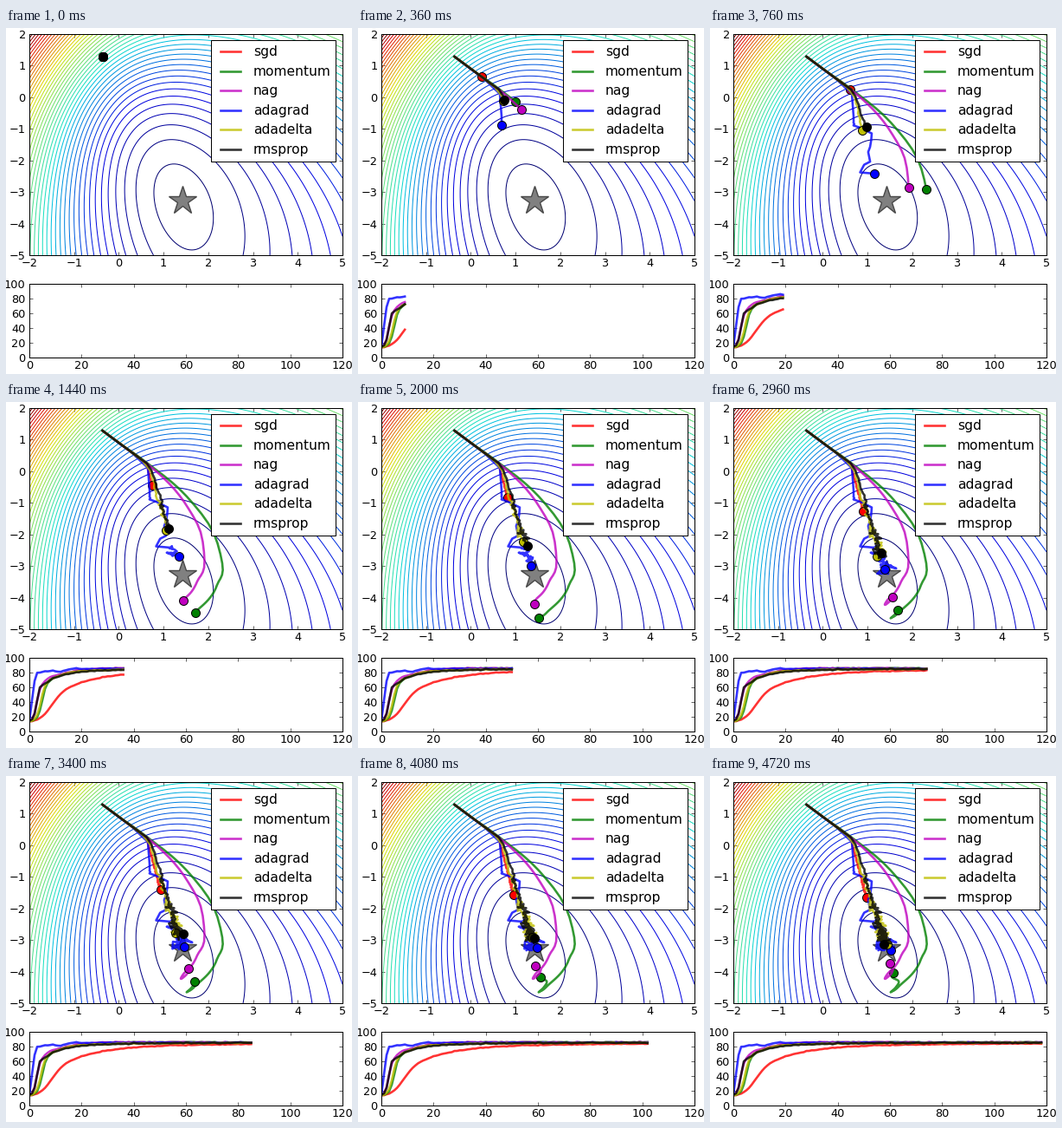
Write a matplotlib script that moves like this. It is 400 px wide and 399 px high and loops after 4.76 s.

```python
import numpy as np
import matplotlib.pyplot as plt
from matplotlib.animation import FuncAnimation
from matplotlib.patches import Rectangle

W, H, DPI = 400, 399, 64
PT = 72 / DPI                      # points per pixel
FRAMES, INTERVAL = 119, 40
HELD = (29, 58, 116)               # frames that repeat the one before
STEPS = np.arange(FRAMES)
NOISE = 0.23                       # spread of the two moons
START = (0, 111.5, 33)
STAR = (204.3, 198.8)
SGD_END = (183, 148)

plt.rcParams.update({
    "font.family": "DejaVu Sans",
    "xtick.direction": "in", "ytick.direction": "in",
    "xtick.top": True, "ytick.right": True,
    "lines.solid_capstyle": "projecting",
})

# Key points after the start: (step, x, y) in stage pixels
SGD = [(8, 140, 54), (14, 154, 64), (19, 162.5, 71.5)]
MOMENTUM = [(3, 129, 46), (7, 164, 71), (12, 209, 109), (16, 240, 151),
            (19, 250, 186), (24, 244, 211), (36, 218.5, 242.5),
            (46, 209.5, 249), (64, 214.5, 244), (85, 218, 236.5),
            (102, 210.5, 232), (118, 212, 227)]
NAG = [(3, 145, 58), (6, 169, 76), (13, 211, 123), (16, 225, 150),
       (19, 229.5, 183.5), (24, 221, 207), (36, 205, 228.5),
       (64, 209.5, 228), (85, 211, 222), (102, 205, 219), (118, 207.5, 216)]
ADAGRAD = [(1, 145, 58), (2, 164, 76), (3, 166, 102), (9, 166, 113),
           (12, 187, 121), (16, 183, 153), (18, 176, 165), (19, 191, 165)]
ADADELTA = [(3, 132, 48), (6, 158, 68), (8, 167, 80), (19, 178, 119)]
RMSPROP = [(4, 156, 66), (6, 163, 71), (9, 170, 82), (19, 179, 115)]

# name, colour, keys, smooth, point of rest, decay in steps, jitter in pixels
METHODS = [
    ("sgd", "r", SGD, True, SGD_END, 44, 0.4),
    ("momentum", "g", MOMENTUM, True, None, 0, 0),
    ("nag", "m", NAG, True, None, 0, 0),
    ("adagrad", "b", ADAGRAD, False, STAR, 30, 3.4),
    ("adadelta", "y", ADADELTA, False, STAR, 44, 2.8),
    ("rmsprop", "k", RMSPROP, False, STAR, 38, 2.8),
]


def spline(t, p):
    """Cubic Hermite curve through the keys, one value per step."""
    slope = np.gradient(p, t)
    i = np.clip(np.searchsorted(t, STEPS, "right") - 1, 0, len(t) - 2)
    h = t[i + 1] - t[i]
    u = np.clip((STEPS - t[i]) / h, 0, 1)
    return ((2*u**3 - 3*u**2 + 1) * p[i] + (u**3 - 2*u**2 + u) * h * slope[i]
            + (3*u**2 - 2*u**3) * p[i + 1] + (u**3 - u**2) * h * slope[i + 1])


def make_path(keys, smooth, rest, decay, jitter):
    """Follow the keys, then drift exponentially to the point of rest."""
    t, *coords = np.array([START] + keys, float).T
    curve = spline if smooth else lambda t, p: np.interp(STEPS, t, p)
    path = np.array([curve(t, p) for p in coords])
    if rest:
        after = STEPS > t[-1]
        rest = np.reshape(rest, (2, 1))
        last = np.reshape(keys[-1][1:], (2, 1))
        path[:, after] = rest + (last - rest) * np.exp(
            (t[-1] - STEPS[after]) / decay)
    amount = jitter * np.interp(STEPS, [4, 19, 50, 75], [0, 0.5, 1, 1.3])
    return path + amount * rng.normal(0, 1, path.shape) * [[1], [0.7]]


def to_weights(x, y):
    return -2 + (x - 27) * 7 / 362, 2 - (y - 7) * 7 / 255


def margins(wx, wy):
    """Margin of a line through the origin on two moons, and its spread."""
    t = (np.arange(40) + 0.5) * np.pi / 40
    vx = np.concatenate([-np.cos(t), 1 - np.cos(t)])
    vy = np.concatenate([-np.sin(t), 0.5 - np.sin(t)])
    wx, wy = np.asarray(wx)[..., None], np.asarray(wy)[..., None]
    return wx * vx + wy * vy, NOISE * np.hypot(wx, wy)


def accuracy(wx, wy):
    margin, spread = margins(wx, wy)
    return 100 * (1 / (1 + np.exp(-1.702 * margin / spread))).mean(-1)


def loss(wx, wy):
    """Mean logistic loss over the noisy moons."""
    margin, spread = margins(wx, wy)
    nodes, weights = np.polynomial.hermite_e.hermegauss(5)
    return sum(w * np.logaddexp(0, -margin - n * spread).mean(-1)
               for n, w in zip(nodes, weights / weights.sum()))


def surface(wx, wy, d=1e-3):
    """Loss tilted so that its minimum lies next to the star."""
    wx, wy = wx + 0.05, wy + 0.045
    sx, sy = to_weights(*STAR)
    gx = (loss(sx + d, sy) - loss(sx - d, sy)) / (2 * d)
    gy = (loss(sx, sy + d) - loss(sx, sy - d)) / (2 * d)
    return loss(wx, wy) - gx * (wx - sx) - gy * (wy - sy)


def add_axes(left, top, right, bottom, xlim, ylim, xticks, yticks):
    ax = fig.add_axes([left / W, 1 - bottom / H,
                       (right - left) / W, (bottom - top) / H])
    ax.set(xlim=xlim, ylim=ylim, xticks=xticks, yticks=yticks)
    ax.tick_params(labelsize=12.9 * PT, length=4.2 * PT, width=0.6 * PT,
                   pad=4.2 * PT)
    ax.tick_params(axis="x", pad=3.4 * PT)
    for spine in ax.spines.values():
        spine.set_linewidth(PT)
    return ax


fig = plt.figure(figsize=(W / DPI, H / DPI), dpi=DPI, facecolor="white")
top_ax = add_axes(27, 7, 389, 262, (-2, 5), (-5, 2),
                  range(-2, 6), range(-5, 3))
acc_ax = add_axes(27, 295, 389, 380, (0, 120), (0, 100),
                  range(0, 121, 20), range(0, 101, 20))

# Contours, the lowest one through four points of the inner ring
gx, gy = np.meshgrid(np.linspace(-2, 5, 130), np.linspace(-5, 2, 130))
z = surface(gx, gy)
rim = to_weights(np.array([171, 238, 192, 213]), np.array([190, 230, 155, 254]))
levels = np.arange(surface(*rim).mean(), z.max(), 0.04)
shades = plt.get_cmap("jet")(np.linspace(0, 1, len(levels)))
shades[:, :3] *= 0.88
top_ax.contour(gx, gy, z, levels=levels, colors=shades, linewidths=PT)

# Overlay in pixels for the star, the paths and the legend
stage = fig.add_axes([0, 0, 1, 1])
stage.set(xlim=(0, W), ylim=(H, 0))
stage.axis("off")
stage.plot(*STAR, "*", ms=34 * PT, mfc="#808080", mec="#484848",
           mew=1.4 * PT, zorder=2)
stage.add_patch(Rectangle((236.5, 13.5), 144, 140, fc="white", ec="black",
                          lw=PT, zorder=20))

rng = np.random.default_rng(4)
parts = []
for i, (name, color, *motion) in enumerate(METHODS):
    style = dict(color=color, lw=2.6 * PT, alpha=0.8)
    path = make_path(*motion)
    acc = accuracy(*to_weights(*path)) + rng.normal(0, 0.25, FRAMES)
    trail, = stage.plot([], [], zorder=3 + i, **style)
    dot, = stage.plot([], [], "o", color=color, ms=10 * PT, mec="black",
                      mew=PT, zorder=3.5 + i)
    curve, = acc_ax.plot([], [], **style)
    parts.append((path, acc, trail, dot, curve))

    row = 27 + 22.5 * i
    stage.plot([248, 270.5], [row, row], zorder=21, **style)
    stage.text(286, row + 5.2, name, size=15.5 * PT, va="baseline", zorder=21)


def update(frame):
    step = frame - (frame in HELD)
    end = step + 1
    for path, acc, trail, dot, curve in parts:
        trail.set_data(path[0, :end], path[1, :end])
        dot.set_data(path[0, step:end], path[1, step:end])
        curve.set_data(STEPS[:end], acc[:end])
    return [artist for part in parts for artist in part[2:]]


anim = FuncAnimation(fig, update, frames=FRAMES, interval=INTERVAL,
                     repeat=True, repeat_delay=0, blit=False)
plt.show()
```
